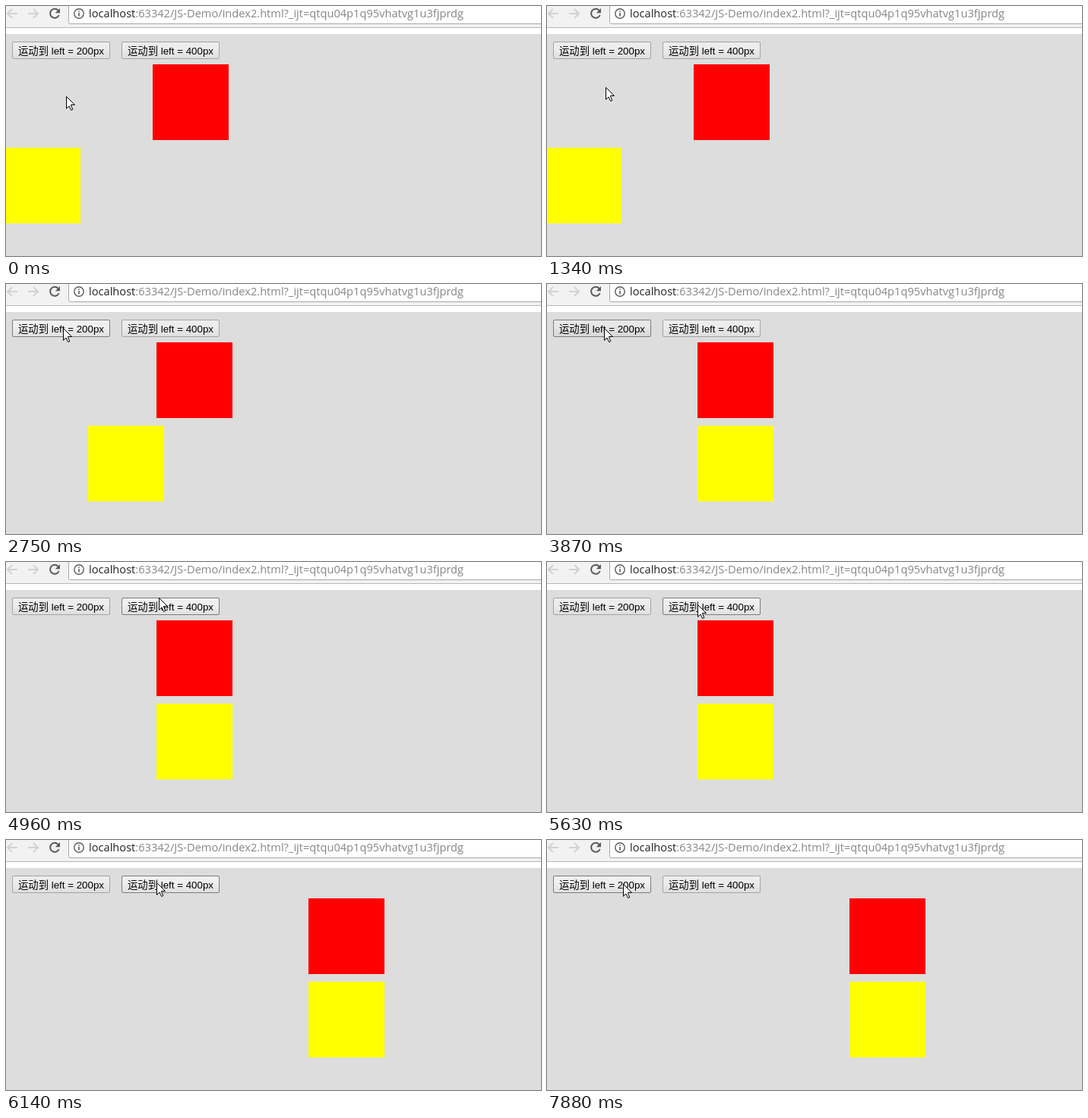
These frames come from a looping animation (704 px wide and 330 px high, 8 s). An HTML page:

```html
<!DOCTYPE html>
<html lang="zh">
<head>
<meta charset="utf-8">
<style>
  html, body { margin: 0; width: 100%; height: 100%; overflow: hidden; }
  svg { display: block; }
  .line { fill: none; stroke: #5a5a5a; stroke-width: 2; }
  .off { stroke: #d2d2d2; }
  .url { font: 14.64px "Open Sans", "Noto Sans", sans-serif; fill: #868686; }
  .host { fill: #222; }
  .button rect { fill: url(#normal); stroke: #a3a3a3; }
  .button text { font: 13.333px "Liberation Sans", "Noto Sans CJK SC", "Noto Sans CJK", sans-serif; }
  .button.hover rect { fill: url(#hover); stroke: #7b7b7b; }
  .button.press rect { fill: url(#press); }
</style>
</head>
<body>
<svg width="704" height="330" viewBox="0 0 704 330">
  <defs>
    <linearGradient id="normal" x2="0" y2="1">
      <stop offset=".38" stop-color="#ededed"/><stop offset="1" stop-color="#dedede"/>
    </linearGradient>
    <linearGradient id="hover" x2="0" y2="1">
      <stop offset=".38" stop-color="#f0f0f0"/><stop offset="1" stop-color="#e0e0e0"/>
    </linearGradient>
    <linearGradient id="press" x2="0" y2="1">
      <stop offset=".38" stop-color="#e7e7e7"/><stop offset="1" stop-color="#d7d7d7"/>
    </linearGradient>
  </defs>

  <rect width="704" height="330" fill="#ddd"/>
  <rect width="704" height="37" fill="#fff"/>
  <rect width="704" height="28" fill="#f2f2f2"/>
  <path d="M0 28.5H704" stroke="#b6b6b6"/>
  <path d="M82.5 -2V21.5Q82.5 23.5 84.5 23.5H710V-2" fill="#fff" stroke="#a8a8a8"/>
  <path class="line off" d="M15 10H2M8 4L2 10L8 16M29 10H42M36 4L42 10L36 16"/>
  <path class="line" d="M68.6 5.8A6 6 0 1 0 69.7 12"/>
  <path d="M71 3V9.2H64.8Z" fill="#5a5a5a"/>
  <circle class="line" cx="96" cy="10" r="6.2" style="stroke-width:1.4"/>
  <path class="line" d="M96 6.2V7.8M96 9V13.6" style="stroke-width:1.6"/>
  <text class="url" x="109" y="15"><tspan class="host">localhost</tspan>:63342/JS-Demo/index2.html?_ijt=qtqu04p1q95vhatvg1u3fjprdg</text>

  <g class="button" transform="translate(8 47)">
    <rect x=".5" y=".5" width="128" height="22" rx="1.5"/>
    <text x="8" y="17">运动到 left = 200px</text>
  </g>
  <g class="button" transform="translate(152 47)">
    <rect x=".5" y=".5" width="128" height="22" rx="1.5"/>
    <text x="8" y="17">运动到 left = 400px</text>
  </g>
  <rect id="red" y="77" width="100" height="100" fill="#f00"/>
  <rect id="yellow" y="187" width="100" height="100" fill="#ff0"/>
  <path id="cursor" d="M.5 .5V16.4L4.1 13L6.6 18.5L8.8 17.6L6.5 12V11.5H11.5Z"
        fill="#fff" stroke="#000" stroke-linejoin="round"/>
</svg>
<script>
  const LOOP = 8000, START = 1340, TICK = 136.2; // the screen refreshes once per tick
  const SPEED = 50;                              // pixels a square slides per tick
  const $ = id => document.getElementById(id);
  const buttons = document.querySelectorAll('.button');
  const clamp = (v, lo, hi) => Math.min(hi, Math.max(lo, v));

  // mouse strokes between rests, in ticks; sag bends the path downwards
  const strokes = [
    { from: -1.1, to: 3, x: 66, y: 49, sag: 0 },
    { from: 6, to: 8, x: 75, y: 58, sag: 0 },
    { from: 21, to: 26, x: 201, y: 47, sag: 14 },
    { from: 29, to: 31, x: 198, y: 56, sag: 0 },
    { from: 44, to: 48, x: 100, y: 58, sag: 18 }
  ];
  const presses = [18, 42];

  function pointerAt(n) {
    let x = 79, y = 119;
    for (const s of strokes) {
      const u = clamp((n - s.from) / (s.to - s.from), 0, 1);
      const ease = u * u * (3 - 2 * u);
      x += (s.x - x) * ease;
      y += (s.y - y) * ease + s.sag * Math.sin(Math.PI * u);
    }
    return [Math.round(x), Math.round(y)];
  }

  // slides to 198 after the first click, on to 398 after the second
  const squareAt = (n, home) =>
    clamp(home + SPEED * (n - 7.8), home, 198) + clamp(SPEED * (n - 31), 0, 200);

  function draw(now) {
    const n = Math.floor((now % LOOP - START) / TICK);
    const [x, y] = pointerAt(n);
    $('cursor').setAttribute('transform', `translate(${x} ${y})`);
    $('red').setAttribute('x', squareAt(n, 193));
    $('yellow').setAttribute('x', squareAt(n, -2));
    buttons.forEach((button, i) => {
      const left = 8 + 144 * i;
      const over = x >= left && x < left + 129 && y >= 47 && y < 70;
      button.classList.toggle('hover', over);
      button.classList.toggle('press', over && presses.includes(n));
    });
    requestAnimationFrame(draw);
  }
  draw(0);
</script>
</body>
</html>
```
